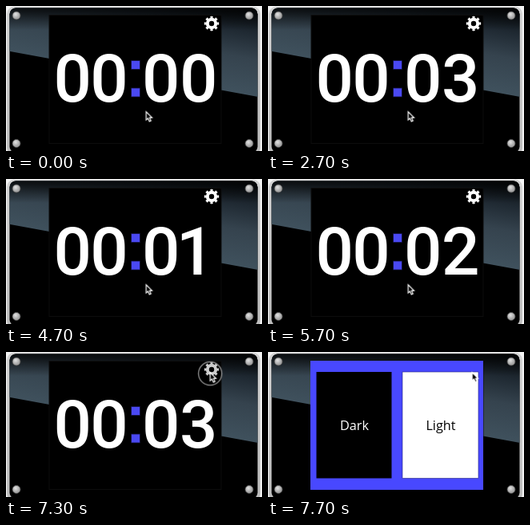
An HTML page for the animation above (8000 ms loop, 320 px wide and 182 px high).

```html
<!DOCTYPE html>
<html lang="en">
<head>
<meta charset="utf-8">
<title>Timer</title>
<style>
  html, body { margin: 0; width: 100%; height: 100%; overflow: hidden; background: #000; }
  body > svg { display: block; width: 100vw; height: 100vh; }
  .digits { font: 500 83.5px Roboto, sans-serif; fill: #fff; }
  .label { font: 16.3px "Open Sans", sans-serif; text-anchor: middle; }
  .seconds, .cursor, .ring, .menu { animation: 8s step-end infinite; }
  .seconds { animation-name: count; }
  .cursor { animation-name: point; }
  .ring { animation-name: tap; }
  .menu { animation-name: reveal; }

  /* Each digit sits 90 units below the previous one. */
  @keyframes count {
    0%, 55% { transform: translateY(0); }
    8.75%, 58.75% { transform: translateY(-90px); }
    21.25%, 71.25% { transform: translateY(-180px); }
    33.75%, 83.75%, 100% { transform: translateY(-270px); }
    46.25% { transform: translateY(-360px); }
  }
  @keyframes point {
    0% { transform: translate(175.2px, 132.7px); }
    78.75% { transform: translate(184px, 121px); }
    80% { transform: translate(212px, 84px); }
    81.25% { transform: translate(239px, 48px); }
    82.5% { transform: translate(251.2px, 32.2px); }
    83.75% { transform: translate(253px, 29px); }
    85% { transform: translate(254px, 27px); }
    86.25% { transform: translate(254.5px, 26px); }
    87.5%, 100% { transform: translate(255.2px, 25.7px); }
  }
  /* One tap resets the clock, the next opens the menu. */
  @keyframes tap {
    0%, 56.25%, 93.75%, 100% { opacity: 0; }
    53.75%, 91.25% { opacity: 1; }
    55%, 92.5% { opacity: .7; }
  }
  @keyframes reveal {
    0% { clip-path: inset(162px 0 0 0); }
    92.5% { clip-path: inset(105px 0 0 0); }
    93.75% { clip-path: inset(44px 0 0 0); }
    95% { clip-path: inset(11px 0 0 0); }
    96.25%, 100% { clip-path: inset(0 0 0 0); }
  }
</style>
</head>
<body>
<svg viewBox="0 0 320 182" preserveAspectRatio="none">
  <defs>
    <linearGradient id="sheen" gradientUnits="userSpaceOnUse" x1="160" y1="-20" x2="141" y2="85">
      <stop offset="0" stop-color="#0c1115"/>
      <stop offset=".25" stop-color="#1f2932"/>
      <stop offset=".55" stop-color="#35434e"/>
      <stop offset="1" stop-color="#40525e"/>
    </linearGradient>
    <linearGradient id="shade" x2="0" y2="1">
      <stop offset="0" stop-opacity=".8"/>
      <stop offset="1" stop-opacity="0"/>
    </linearGradient>
    <linearGradient id="metal" x2="0" y2="1">
      <stop offset="0" stop-color="#d2d2d2"/>
      <stop offset="1" stop-color="#bcbcbc"/>
    </linearGradient>
    <radialGradient id="steel" cx=".4" cy=".35">
      <stop offset="0" stop-color="#e2e2e2"/>
      <stop offset="1" stop-color="#a4a4a4"/>
    </radialGradient>
    <clipPath id="inside"><rect x="4.5" y="2.5" width="310" height="182" rx="8"/></clipPath>
    <circle id="screw" r="5" fill="url(#steel)" stroke="#4a4a4a" stroke-width=".8"/>
  </defs>

  <!-- Case -->
  <rect width="320" height="182" fill="#f4f4f4"/>
  <rect x="1" y=".8" width="317" height="186" rx="9" fill="url(#metal)"/>
  <g clip-path="url(#inside)">
    <rect width="320" height="182"/>
    <path d="M0 2H320V115L0 56Z" fill="url(#sheen)"/>
    <rect y="2" width="320" height="28" fill="url(#shade)"/>
  </g>
  <use href="#screw" x="13" y="12"/>
  <use href="#screw" x="304" y="12"/>
  <use href="#screw" x="13" y="172.5"/>
  <use href="#screw" x="304" y="172.5"/>

  <!-- Clock -->
  <rect x="54" y="11.5" width="215" height="161" stroke="#0d0d0d"/>
  <g class="digits">
    <text x="59.5 105.2" y="120">00</text>
    <text x="170" y="120">0</text>
    <svg x="217" y="50" width="52" height="80" overflow="hidden">
      <g class="seconds">
        <text y="70">0</text>
        <text x="-4" y="160">1</text>
        <text y="250">2</text>
        <text y="340">3</text>
        <text y="430">4</text>
      </g>
    </svg>
  </g>
  <path d="M157 69h10v10h-10zM157 103.5h10v10h-10z" fill="#4a49f2" stroke="#4a49f2" stroke-opacity=".4" stroke-width="1.4"/>
  <g transform="translate(257 22)" fill="none" stroke="#fff">
    <circle r="5.2" stroke-width="4"/>
    <circle r="7.8" stroke-width="2.8" pathLength="16" stroke-dasharray="1 1" stroke-dashoffset=".5"/>
  </g>

  <!-- Theme menu -->
  <g class="menu">
    <rect x="53" y="11" width="216" height="162" fill="#4848ff"/>
    <rect x="60.5" y="25" width="94" height="133.5"/>
    <rect x="168" y="25" width="95" height="133.5" fill="#fff" stroke="#24247a" stroke-width=".6"/>
    <text class="label" x="108" y="97.5" fill="#fff">Dark</text>
    <text class="label" x="216" y="97.5">Light</text>
  </g>

  <g class="cursor">
    <circle class="ring" cy="1.3" r="14.6" fill="#000" fill-opacity=".2" stroke="#a0a0a0" stroke-width="1.2"/>
    <path d="M0 0V10.2L2.3 8.2L4.1 12.1L6 11.2L4.3 7.4H7.3Z" stroke="#fff" stroke-width="1.2"/>
  </g>
</svg>
</body>
</html>
```
